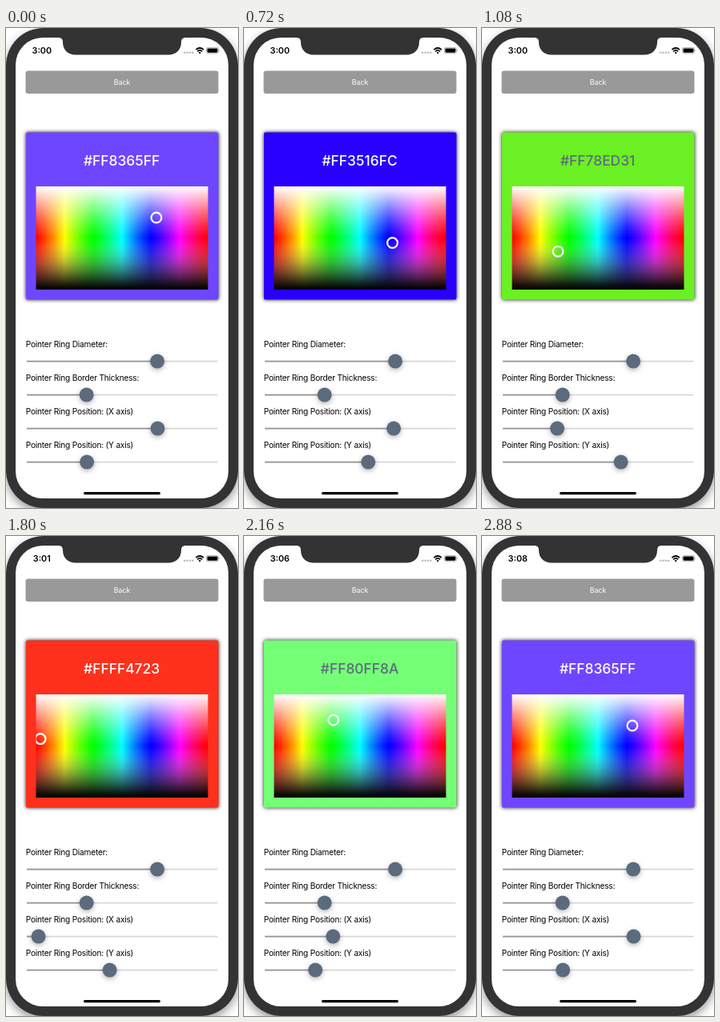
An HTML page for the animation above (3.24 s loop, 290 px wide and 600 px high).

```html
<!DOCTYPE html>
<html lang="en">
<head>
<meta charset="utf-8">
<title>Color picker</title>
<style>
  html, body { margin: 0; width: 100%; height: 100%; overflow: hidden; background: #fff; }
  svg { display: block; width: 290px; height: 600px; font-family: Inter, "Liberation Sans", sans-serif; }
  .mid { text-anchor: middle; }
  #clock { font-size: 10.8px; font-weight: 600; }
  #hex { font-size: 17.4px; font-weight: 550; }
  .back { font-size: 8.9px; fill: #fff; }
  .label { font-size: 10.15px; letter-spacing: -.02em; }
  .body { filter: drop-shadow(0 5px 6px rgba(0, 0, 0, .4)); }
  .card { filter: drop-shadow(0 0 2.5px rgba(0, 0, 0, .95)); }
  .knob { fill: #5b6b7d; filter: drop-shadow(0 2px 3px rgba(0, 0, 0, .3)); }
</style>
</head>
<body>
<svg viewBox="0 0 290 600">
  <defs>
    <linearGradient id="hue">
      <stop offset="0" stop-color="#f00"/>
      <stop offset=".1667" stop-color="#ff0"/>
      <stop offset=".3333" stop-color="#0f0"/>
      <stop offset=".5" stop-color="#0ff"/>
      <stop offset=".6667" stop-color="#00f"/>
      <stop offset=".8333" stop-color="#f0f"/>
      <stop offset="1" stop-color="#f00"/>
    </linearGradient>
    <linearGradient id="shade" x2="0" y2="1">
      <stop offset="0" stop-color="#fff"/>
      <stop offset=".5" stop-color="#fff" stop-opacity="0"/>
      <stop offset="1" stop-color="#000"/>
    </linearGradient>
    <!-- deeper midtones, as on the device screen -->
    <filter id="deepen" x="0" y="0" width="1" height="1" color-interpolation-filters="sRGB">
      <feComponentTransfer>
        <feFuncR type="gamma" exponent="1.25"/>
        <feFuncG type="gamma" exponent="1.25"/>
        <feFuncB type="gamma" exponent="1.25"/>
      </feComponentTransfer>
    </filter>
    <clipPath id="area"><rect x="37.5" y="198" width="215" height="129"/></clipPath>
  </defs>

  <!-- phone -->
  <rect class="body" width="290" height="600" rx="47" fill="#333"/>
  <rect x="12" y="12" width="266" height="576" rx="34" fill="#fff"/>
  <path d="M66 11.5V12Q71 12.3 71 17.5C71 27 77 33.5 87 33.5H203C213 33.5 219 27 219 17.5Q219 12.3 224 12V11.5Z" fill="#333"/>
  <rect x="97" y="580" width="96" height="3.2" rx="1.6"/>

  <!-- status bar -->
  <text id="clock" class="mid" x="44.8" y="32.2"></text>
  <path d="M222 30.7h12.5" stroke="#b5b5b5" stroke-width="2" stroke-dasharray="2.3 1.05"/>
  <g fill="none" stroke="#000" stroke-width="1.7">
    <path d="M237.4 27.2Q242.2 22.8 247 27.2"/>
    <path d="M239.2 29.3Q242.2 26.6 245.2 29.3"/>
  </g>
  <path d="M240.6 30.7Q242.2 29.4 243.8 30.7L242.2 32.4Z"/>
  <rect x="250.4" y="24.4" width="15.2" height="7.4" rx="2" fill="none" stroke="#999" stroke-width=".7"/>
  <rect x="251.5" y="25.5" width="13" height="5.2" rx="1.1"/>
  <path d="M266.4 26.8q1.3 1.3 0 2.6z" fill="#888"/>

  <rect x="24.5" y="53.5" width="241" height="28.5" rx="3" fill="#999"/>
  <text class="back mid" x="145" y="71.2">Back</text>

  <!-- picker -->
  <rect id="card" class="card" x="25" y="130.5" width="240.5" height="209" rx="1.5"/>
  <text id="hex" class="mid" x="144.6" y="172.3"></text>
  <g clip-path="url(#area)">
    <g filter="url(#deepen)">
      <rect x="37" y="198" width="216" height="129" fill="url(#hue)"/>
      <rect x="37" y="198" width="216" height="129" fill="url(#shade)"/>
    </g>
    <circle id="ring" r="6.4" fill="none" stroke="#fff" stroke-width="2.2"/>
  </g>

  <g id="sliders"></g>
</svg>
<script>
  const STEP = 360;
  const WHITE = '#fff', SLATE = '#5b6b7d';
  // clock, hex label, card colour, label colour, pointer x and y in 0..1
  const states = [
    ['3:00', '8365FF', '#6f46ff', WHITE, .702, .302],
    ['3:00', '5129FF', '#4313ff', WHITE, .697, .424],
    ['3:00', '3516FC', '#2900ff', WHITE, .691, .547],
    ['3:00', '78ED31', '#6bf024', SLATE, .270, .630],
    ['3:00', 'FEE60E', '#ffe600', SLATE, .149, .530],
    ['3:01', 'FF4723', '#ff301c', WHITE, .028, .431],
    ['3:06', '80FF8A', '#74ff77', SLATE, .348, .248],
    ['3:07', '73EAFF', '#5feaff', SLATE, .525, .275],
    ['3:08', '8365FF', '#6f46ff', WHITE, .702, .302]
  ];

  const $ = id => document.getElementById(id);
  const set = (el, attrs) => { for (const k in attrs) el.setAttribute(k, attrs[k]); };
  const rowY = i => 416.6 + 42 * i;

  const names = ['Diameter:', 'Border Thickness:', 'Position: (X axis)', 'Position: (Y axis)'];
  $('sliders').innerHTML = names.map((name, i) => {
    const y = rowY(i);
    return `<text class="label" x="24.7" y="${y - 17.8}">Pointer Ring ${name}</text>
      <path d="M26 ${y}H264.5" stroke="#d8d8d8" stroke-width="1.8"/>
      <path class="fill" stroke="#999" stroke-width="1.8"/>
      <circle class="knob" cy="${y}" r="9"/>`;
  }).join('');
  const fills = document.querySelectorAll('.fill');
  const knobs = document.querySelectorAll('.knob');

  function slide(i, value) {
    const x = 34.4 + 221 * value;
    set(knobs[i], { cx: x });
    set(fills[i], { d: `M26 ${rowY(i)}H${x}` });
  }

  function show([time, hex, color, ink, x, y]) {
    $('clock').textContent = time;
    $('hex').textContent = '#FF' + hex;
    set($('hex'), { fill: ink });
    set($('card'), { fill: color });
    set($('ring'), { cx: 37 + 215 * x, cy: 198 + 129 * y });
    [.7, .3, x, y].forEach((value, i) => slide(i, value));
  }

  let current = -1;
  function tick() {
    const next = Math.floor(performance.now() / STEP) % states.length;
    if (next !== current) show(states[current = next]);
    requestAnimationFrame(tick);
  }
  tick();
</script>
</body>
</html>
```
